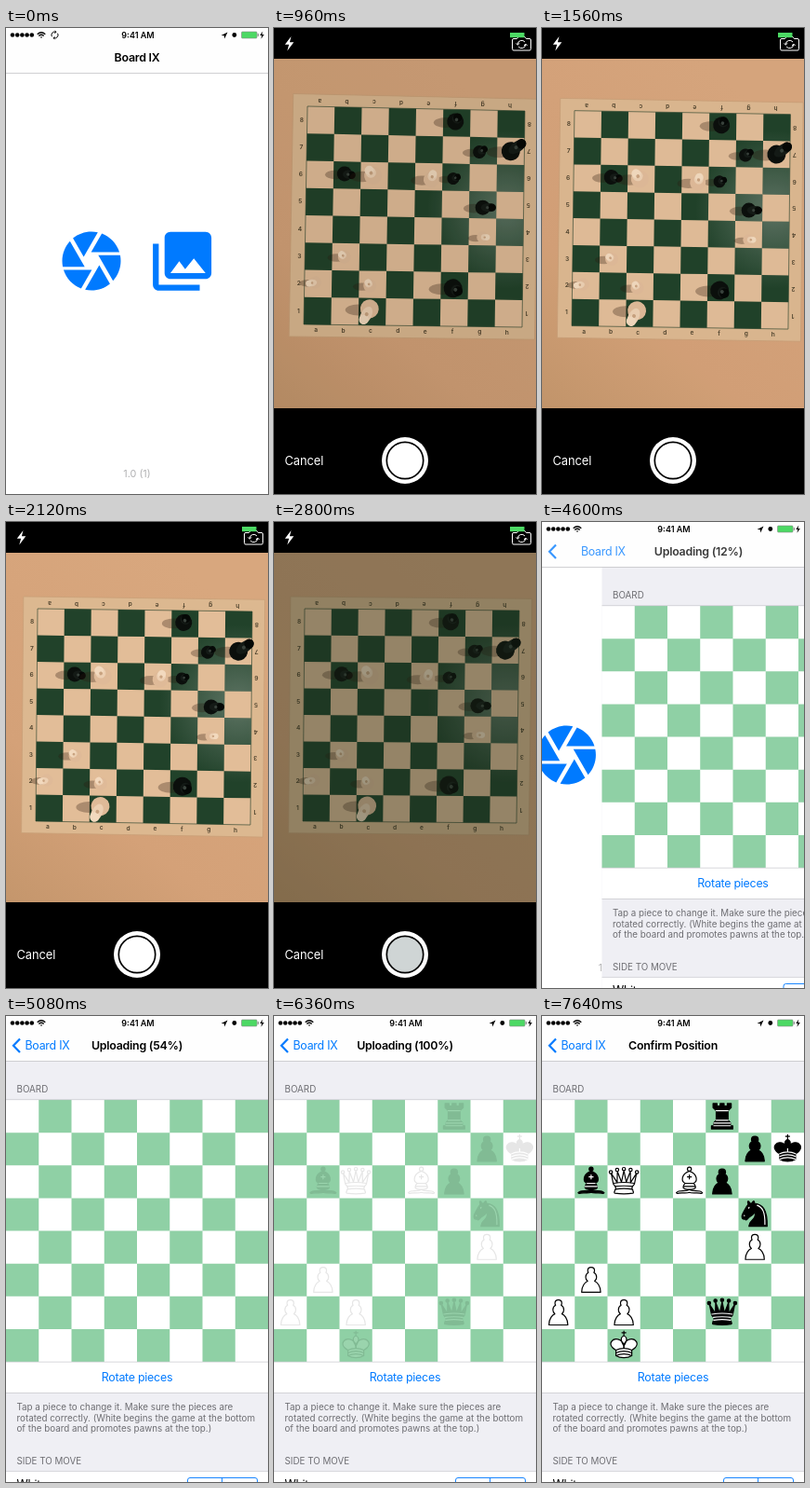
An HTML page that plays this animation: 282x500 px, repeating every 8.04 s.

```html
<!DOCTYPE html>
<html lang="en">
<head>
<meta charset="utf-8">
<title>Board scanner</title>
<style>
html, body { margin: 0; width: 100%; height: 100%; overflow: hidden; background: #fff; }
svg { display: block; width: 100vw; height: 100vh; }
text { font-family: Inter, "Liberation Sans", sans-serif; }
.bar { font-size: 12.4px; letter-spacing: -.25px; }
.cam { font-size: 12.9px; letter-spacing: -.1px; fill: #fff; }
.bold { font-weight: 600; }
.mid { text-anchor: middle; }
.blue { fill: #007aff; }
.note { font-size: 9.8px; fill: #6d6d72; }
.tag { font-size: 6.6px; font-weight: 600; fill: #4c402c; text-anchor: middle; }
</style>
</head>
<body>
<svg viewBox="0 0 282 500">
  <defs>
    <linearGradient id="table" x1="0" y1="1" x2=".6" y2="0">
      <stop offset="0" stop-color="#c4966c"/><stop offset=".35" stop-color="#d4a178"/><stop offset="1" stop-color="#d8a77e"/>
    </linearGradient>
    <radialGradient id="glare" gradientUnits="userSpaceOnUse" cx="250" cy="195" r="85">
      <stop offset="0" stop-color="#c8ccc8" stop-opacity=".36"/><stop offset="1" stop-color="#c8ccc8" stop-opacity="0"/>
    </radialGradient>
    <clipPath id="frame"><rect y="33" width="282" height="375"/></clipPath>
  </defs>

  <rect width="282" height="500" fill="#fff"/>
  <g id="home">
    <rect width="282" height="500" fill="#fff"/>
    <g class="blue">
      <path transform="translate(54.2 212.2) scale(3.15)" d="M9.4 10.5l4.77-8.26C13.47 2.09 12.75 2 12 2c-2.4 0-4.6.85-6.32 2.25l3.66 6.35.06-.1zM21.54 9c-.92-2.92-3.15-5.26-6-6.34L11.88 9h9.66zm.26 1h-7.49l.29.5 4.76 8.25C21 16.97 22 14.61 22 12c0-.69-.07-1.35-.2-2zM8.54 12l-3.9-6.75C3.01 7.03 2 9.39 2 12c0 .69.07 1.35.2 2h7.49l-1.15-2zm-6.08 3c.92 2.92 3.15 5.26 6 6.34L12.12 15H2.46zm11.27 0l-3.9 6.76c.7.15 1.42.24 2.17.24 2.4 0 4.6-.85 6.32-2.25l-3.66-6.35-.93 1.6z"/>
      <path transform="translate(151.8 212.5) scale(3.15)" d="M22 16V4c0-1.1-.9-2-2-2H8c-1.1 0-2 .9-2 2v12c0 1.1.9 2 2 2h12c1.1 0 2-.9 2-2zm-11-4l2.03 2.71L16 11l4 5H8l3-4zM2 6v14c0 1.1.9 2 2 2h14v-2H4V6H2z"/>
    </g>
    <text class="mid" x="141" y="482" font-size="10.8" fill="#b0b0b2">1.0 (1)</text>
  </g>

  <g id="page">
    <rect width="282" height="500" fill="#efeff4"/>
    <text class="note" x="11.5" y="82" font-size="9.6">BOARD</text>
    <rect y="90" width="282" height="314" fill="#fff"/>
    <path id="cells" fill="#8fd0a5"/>
    <path d="M0 89.7h282M0 371.2h282M0 404.5h282M0 488.7h282" stroke="#c8c7cc" stroke-width=".7"/>
    <g id="men" stroke="#000" stroke-width="1.4" stroke-linejoin="round" stroke-linecap="round"></g>
    <text class="bar blue mid" x="141" y="391.7">Rotate pieces</text>
    <text class="note" x="11.5" y="422.7">Tap a piece to change it. Make sure the pieces are</text>
    <text class="note" x="11.5" y="434.5">rotated correctly. (White begins the game at the bottom</text>
    <text class="note" x="11.5" y="446.3">of the board and promotes pawns at the top.)</text>
    <text class="note" x="11.5" y="481">SIDE TO MOVE</text>
    <rect y="489" width="282" height="11" fill="#fff"/>
    <text class="bar" x="11.5" y="506.5">White</text>
    <path d="M195.5 501v-3q0-2.5 2.5-2.5h70q2.5 0 2.5 2.5v3M232.500 495.500v6" fill="none" stroke="#007aff" stroke-width=".9"/>
  </g>

  <g id="nav">
    <rect width="282" height="48.5" fill="#fefefe"/>
    <path d="M0 48.500h282" stroke="#c4c4c8" stroke-width=".8"/>
    <g id="dots"></g>
    <g fill="none" stroke="#000" stroke-width="1.3">
      <path d="M33.7 6.7q4.3-4 8.6 0M35.3 8.5q2.7-2.4 5.4 0"/>
      <path id="sync" stroke-width="1" d="M49.4 9.2A3.4 3.4 0 0 1 53.5 4.3M55.6 5.8A3.4 3.4 0 0 1 51.5 10.7M52.5 2.8l1.5 1.5-1.6 1.3M52.5 9.4l-1.5 1.3 1.5 1.5"/>
    </g>
    <path d="M36.7 9.500h2.6L38 11zM231.500 8l7-3.500-3.300 7-.4-3.300zM276.300 3.500l-3 4.600h2l-.8 3.700 3.300-4.900h-2.200z"/>
    <circle cx="245.8" cy="7.5" r="2.4"/>
    <rect x="253.5" y="4" width="16.6" height="7" rx="1" fill="#4cd964" stroke="#888" stroke-width=".6"/>
    <path d="M271.300 6v3" stroke="#777"/>
    <text class="bold mid" x="142" y="10.8" font-size="9">9:41 AM</text>
    <text id="name" class="bar bold mid" y="36">Board IX</text>
    <g id="back">
      <path d="M15 24.500L8 31.700l7 7.200" fill="none" stroke="#007aff" stroke-width="2.2"/>
      <text id="backName" class="bar blue" y="36">Board IX</text>
    </g>
    <text id="title" class="bar bold mid" y="36"></text>
  </g>

  <g id="cam">
    <rect width="282" height="500"/>
    <g id="photo" clip-path="url(#frame)">
      <rect y="33" width="282" height="375" fill="url(#table)"/>
      <path id="mat" fill="#dcb890" stroke="#c9a078" stroke-width=".8" stroke-linejoin="round"/>
      <path id="light" fill="#e2bd98" stroke="#4d5a40" stroke-width=".8"/>
      <path id="dark" fill="#21422a"/>
      <path id="shine" fill="url(#glare)"/>
      <g id="tags"></g>
      <g id="toys"></g>
      <rect id="shade" y="33" width="282" height="375" fill="#140c08"/>
      <rect id="dim" y="33" width="282" height="375" fill="#1a2818"/>
    </g>
    <g id="controls">
      <path d="M18.5 9l-6.7 8.700h4.300l-1.800 6.800 7-9.300h-4.400z" fill="#fff"/>
      <g fill="none" stroke="#fff">
        <path d="M258 11.500h3.500l1.500-2h7l1.500 2h3.500q1.500 0 1.500 1.500v9.500q0 1.500-1.500 1.500h-17q-1.500 0-1.500-1.500v-9.500q0-1.500 1.500-1.500z"/>
        <path d="M262.300 17.500a4.300 4.300 0 0 1 7.700-2.500M270.800 17.500a4.300 4.300 0 0 1-7.700 2.500M260.700 16.300l1.600 2 1.800-2M269 19l1.800-2 1.700 2"/>
      </g>
      <rect x="254" y="5" width="15.5" height="5.2" fill="#4cd964"/>
      <circle cx="141" cy="464" r="25" fill="#fff"/>
      <circle id="shutter" cx="141" cy="464" r="19.7" stroke="#000" stroke-width="1.7"/>
      <text class="cam" x="11.5" y="468.7">Cancel</text>
    </g>
    <g id="review" class="cam">
      <text x="11.5" y="474">Retake</text>
      <text x="270.5" y="474" text-anchor="end">Use Photo</text>
    </g>
  </g>
</svg>
<script>
const LOOP = 8040, W = 282, H = 500;
const $ = id => document.getElementById(id);
const set = (el, attrs) => { for (const k in attrs) el.setAttribute(k, attrs[k]); return el; };
const add = (parent, tag, attrs) =>
  parent.appendChild(set(document.createElementNS('http://www.w3.org/2000/svg', tag), attrs));
const clamp = x => Math.min(1, Math.max(0, x));
const ramp = (t, a, b) => clamp((t - a) / (b - a));
const mix = (a, b, k) => a + (b - a) * k;
const show = (el, on) => { el.style.display = on ? '' : 'none'; };
const spring = (t, start) => {
  const x = Math.max(0, t - start) * .014, y = 1 - (1 + x) * Math.exp(-x);
  return y > .995 ? 1 : y;
};

for (let i = 0; i < 5; i++) add($('dots'), 'circle', { cx: 7 + i * 5.2, cy: 7.5, r: 2.3 });

// Diagram: squares and pieces drawn on a 45 unit grid
const CW = W / 8, CH = 281 / 8;
const odd = [];
for (let i = 0; i < 64; i++) if ((i + (i >> 3)) % 2) odd.push([i % 8, i >> 3]);
$('cells').setAttribute('d', odd.map(([c, r]) => `M${c * CW} ${90 + r * CH}h${CW}v${CH}h${-CW}z`).join(''));

const ball = (x, y, r) => `M${x - r} ${y}a${r} ${r} 0 1 1 ${2 * r} 0a${r} ${r} 0 1 1 ${-2 * r} 0z`;
const shapes = {
  p: ['M22.5 8c-2.5 0-4.3 1.9-4.3 4.2 0 .9.3 1.7.8 2.4-2 1.1-3.4 3.3-3.4 5.8 0 2.1 1 4 2.5 5.2C15 26.7 10.5 31.5 10.5 39.5h24c0-8-4.5-12.8-7.6-13.9 1.5-1.2 2.5-3.1 2.5-5.2 0-2.5-1.4-4.7-3.4-5.8.5-.7.8-1.5.8-2.4 0-2.3-1.8-4.2-4.3-4.2z', ''],
  r: ['M9 40v-4h3v-4l3-3V17l-4-4V8h5v3h4V8h5v3h4V8h5v5l-4 4v12l3 3v4h3v4z', 'M15 17h15M15 29h15M12 32.5h21M12 36h21'],
  n: ['M22 10c10.5 1 16.5 8 16 29H15c0-9 10-6.5 8-21l1 0c.4 2.9-5.5 7.4-8 9-3 2-2.8 4.3-5 4-1-.9 1.4-3 0-3-1 0 .2 1.2-1 2-1 0-4 1-4-4 0-2 6-12 6-12s1.9-1.9 2-3.5c-.7-1-.5-2-.5-3 1-1 3 2.5 3 2.5h2s.8-2 2.5-3c1 0 1 3 1 3z', 'M9 25.5h.3M14.7 16l.5-1M25.5 12.5c7 2.5 10 9 9.7 24'],
  b: ['M9 36c3.4-1 10.1.4 13.5-2 3.4 2.4 10.1 1 13.5 2 0 0 1.7.5 3 2-.7 1-1.6 1-3 .5-3.4-1-10.1.5-13.5-1-3.4 1.5-10.1 0-13.5 1-1.4.5-2.3.5-3-.5 1.3-1.5 3-2 3-2zM15 32c2.5 2.5 12.5 2.5 15 0 .5-1.5 0-2 0-2 0-2.5-2.5-4-2.5-4 5.5-1.5 6-11.5-5-15.5-11 4-10.5 14-5 15.5 0 0-2.5 1.5-2.5 4 0 0-.5.5 0 2z' + ball(22.5, 8, 2.5), 'M17.5 26h10M15 30h15M22.5 15.5v5M20 18h5'],
  q: ['M9 26l-2.5-12.5L14 25l.3-14.1 5.2 13.6 3-14.5 3 14.5 5.2-13.6L31 25l7.5-11.5L36 26c0 2-1.5 2-2.5 4-1 1.5-1 1-.5 3.5 1.5 1 1 2.5 1 2.5 1.5 1.5 0 2.5 0 2.5-6.5 1-16.5 1-23 0 0 0-1.5-1 0-2.5 0 0-.5-1.5 1-2.5.5-2.5.5-2-.5-3.5-1-2-2.5-2-2.5-4z' + [[6, 12], [14, 9], [22.5, 8], [31, 9], [39, 12]].map(p => ball(...p, 2)).join(''), 'M9.5 26c8-1.5 18-1.5 26 0M11.5 30c4-1 18-1 22 0M12 33.5c6-1 15-1 21 0'],
  k: ['M22.5 11.6V6M20 8h5M22.5 25s4.5-7.5 3-10.5c0 0-1-2.5-3-2.5s-3 2.5-3 2.5c-1.5 3 3 10.5 3 10.5M12.5 37c5.5 3.5 14.5 3.5 20 0v-7s9-4.5 6-10.5c-4-6.5-13.5-3.5-16 4V27v-3.5c-2.5-7.5-12-10.5-16-4-3 6 6 10.5 6 10.5z', 'M12.5 30c5.5-3 14.5-3 20 0M12.5 33.5c5.5-3 14.5-3 20 0M12.5 37c5.5-3 14.5-3 20 0M22.5 23.5v3.5']
};
'.....r../......pk/.bQ.Bp../......n./......P./.P....../P.P..q../..K.....'.split('/').forEach((row, r) =>
  [...row].forEach((ch, c) => {
    if (ch === '.') return;
    const black = ch === ch.toLowerCase(), [body, lines] = shapes[ch.toLowerCase()];
    const g = add($('men'), 'g', {
      transform: `translate(${(c + .5) * CW} ${90 + (r + .5) * CH}) scale(.85) translate(-22.5 -24)`
    });
    add(g, 'path', { d: body, fill: black ? '#000' : '#fff' });
    add(g, 'path', { d: lines, fill: 'none', stroke: black ? '#fff' : '#000' });
  }));

// Photo: corners TL, TR, BR, BL of the playing area over time
const keys = [
  [560, 37, 81, 272, 86, 269, 319, 33, 315],
  [960, 36, 84, 270, 89, 267, 321, 32, 318],
  [2120, 34, 93, 265, 96, 263, 325, 32, 321],
  [2800, 33, 93, 264, 95, 261, 323, 31, 321],
  [3000, 33, 94.5, 261.5, 96, 260, 325.5, 30.5, 321]
];
function corners(t) {
  let i = 0;
  while (i < keys.length - 2 && t > keys[i + 1][0]) i++;
  const [a, b] = [keys[i], keys[i + 1]], k = ramp(t, a[0], b[0]);
  return a.slice(1).map((v, j) => mix(v, b[j + 1], k));
}
const at = (q, u, v) => [0, 1].map(i =>
  mix(mix(q[i], q[2 + i], u / 8), mix(q[6 + i], q[4 + i], u / 8), v / 8).toFixed(2));
const quad = (q, u0, v0, u1, v1) =>
  'M' + [[u0, v0], [u1, v0], [u1, v1], [u0, v1]].map(p => at(q, ...p).join(' ')).join('L') + 'z';

const tags = [];
const tag = (s, u, v, turn) => {
  const el = add($('tags'), 'text', { class: 'tag', y: 2.2 });
  el.textContent = s;
  tags.push([el, u, v, turn]);
};
for (let i = 0; i < 8; i++) {
  tag('abcdefgh'[i], i + .45, -.2, 180);
  tag('abcdefgh'[i], i + .45, 8.2, 0);
  tag(8 - i, -.2, i + .5, 0);
  tag(8 - i, 8.17, i + .5, 180);
}

// Board place, base radius, length and lean of each piece
const toys = [
  [5.45, .45, 9, 5, -60, 1], [6.35, 1.55, 7, 6, -30, 1], [7.5, 1.5, 10, 14, -35, 1], [5.4, 2.55, 6.5, 5, -20, 1],
  [1.4, 2.45, 8, 8, 10, 1], [6.5, 3.6, 8, 10, 0, 1], [5.45, 6.6, 10, 6, 30, 1],
  [2.45, 2.5, 9.5, 7, -125, 0], [4.6, 2.6, 8.5, 6, -75, 0], [6.5, 4.7, 6, 5, 0, 0], [1.45, 5.5, 7, 4, -140, 0],
  [.4, 6.45, 6.5, 7, 170, 0], [2.4, 6.55, 7, 4, -120, 0], [2.4, 7.4, 10, 13, 118, 0]
].map(([u, v, r, len, lean, black]) => {
  const g = add($('toys'), 'g', {});
  add(g, 'ellipse', { cx: -r * 1.2, cy: 1, rx: r * 1.4, ry: r * .6, fill: '#2a180c', opacity: .3 });
  const b = add(g, 'g', { transform: `rotate(${lean})` });
  add(b, 'circle', { r, fill: black ? '#0b0f0c' : '#dfba98' });
  add(b, 'ellipse', { cx: len * .6, rx: len * .7 + 1, ry: r * .58, fill: black ? '#141a16' : '#eccfb2' });
  add(b, 'circle', { cx: len, r: r * .52, fill: black ? '#050806' : '#f2d9be' });
  add(b, 'circle', { cx: len * .5, r: r * .2, fill: black ? '#39423c' : '#c9a380' });
  return [g, u, v];
});

function drawPhoto(t) {
  const q = corners(t), put = (el, u, v, more = '') =>
    el.setAttribute('transform', `translate(${at(q, u, v)}) ${more}`);
  const squares = odd.map(([c, r]) => quad(q, c, r, c + 1, r + 1)).join('');
  $('mat').setAttribute('d', quad(q, -.53, -.45, 8.47, 8.45));
  $('light').setAttribute('d', quad(q, 0, 0, 8, 8));
  $('dark').setAttribute('d', squares);
  $('shine').setAttribute('d', squares);
  for (const [el, u, v, turn] of tags) put(el, u, v, `rotate(${turn})`);
  for (const [el, u, v] of toys) put(el, u, v);
}

function drawCamera(t) {
  const rise = spring(t, 80), fall = spring(t, 3902.4), review = t >= 2960;
  const on = rise > 0 && fall < 1;
  show($('cam'), on);
  if (!on) return;
  $('cam').setAttribute('transform', `translate(0 ${(H * (1 - rise + fall)).toFixed(2)})`);
  show($('controls'), !review);
  show($('review'), review);
  set($('photo'), { transform: `translate(0 ${review ? 30 : 0})`, opacity: ramp(t, 520, 760) });
  $('shade').setAttribute('opacity', .1 * (1 - ramp(t, 900, 1700)));
  $('dim').setAttribute('opacity', review ? 1 - ramp(t, 2960, 3080) : ramp(t, 2720, 2930));
  $('shutter').setAttribute('fill', t >= 2600 ? '#cfd5d5' : '#fff');
  drawPhoto(t);
}

function drawPages(t) {
  const k = spring(t, 4400), slide = 1 - k;
  $('home').setAttribute('transform', `translate(${-85 * k} 0)`);
  show($('page'), k > 0);
  $('page').setAttribute('transform', `translate(${W * slide} 0)`);
  show($('sync'), t < 600);
  set($('name'), { x: mix(141, 46, k), opacity: clamp(1 - 1.6 * k) });
  $('back').setAttribute('opacity', k);
  $('backName').setAttribute('x', mix(114, 20.5, k));
  set($('title'), { x: 141 + 120 * slide, opacity: k });
  const percent = Math.floor(100 * ramp(t, 4460, 5600));
  $('title').textContent = t < 6400 ? `Uploading (${percent}%)` : 'Confirm Position';
  $('men').setAttribute('opacity', ramp(t, 6330, 6640));
}

const start = performance.now();
function tick() {
  const t = (performance.now() - start) % LOOP;
  drawPages(t);
  drawCamera(t);
  requestAnimationFrame(tick);
}
tick();
</script>
</body>
</html>
```
